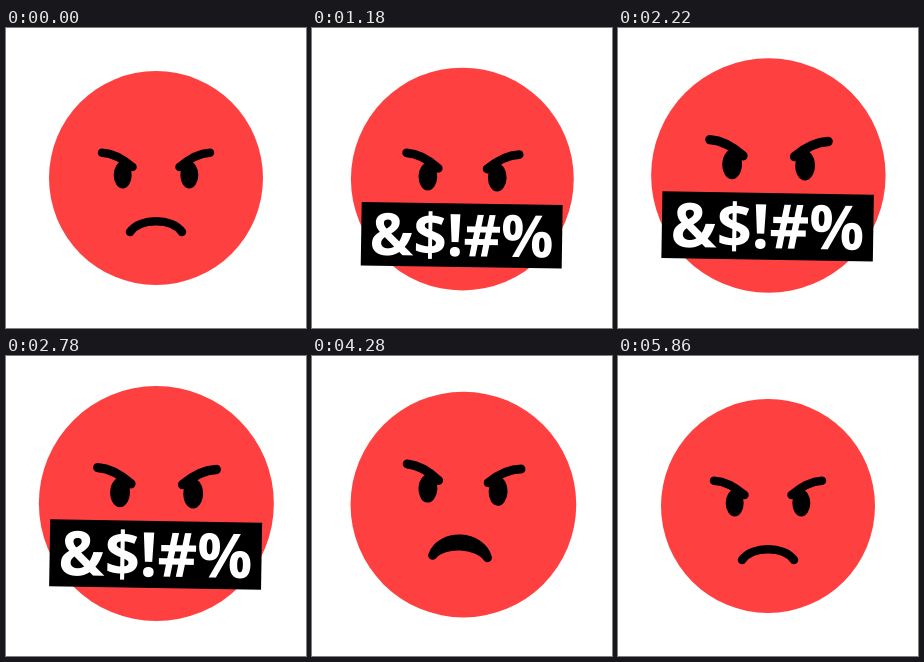
An HTML page that plays this animation: 300 by 300 pixels, repeating every 5.92 s.

```html
<!DOCTYPE html>
<html lang="en">
<head>
<meta charset="utf-8">
<title>Furious face</title>
<style>
  html, body { margin: 0; width: 100%; height: 100%; overflow: hidden; background: #fff; }
  svg { display: block; width: 100%; height: 100%; }
  .line { fill: none; stroke: #000; stroke-width: 8.5; stroke-linecap: round; stroke-linejoin: round; }
  text { font: 700 56px "Noto Sans", "Open Sans", sans-serif; fill: #fff; text-anchor: middle; }
</style>
</head>
<body>
<svg viewBox="0 0 300 300">
  <defs>
    <g id="eye">
      <ellipse cx="33.3" rx="9" ry="13.5"/>
      <path class="line" d="M54-22.3Q39-21.5 23.5-8"/>
    </g>
  </defs>
  <circle id="head" fill="#ff4040"/>
  <g id="face">
    <use href="#eye"/>
    <use href="#eye" transform="scale(-1 1)"/>
    <path id="mouth" class="line"/>
    <g id="bar">
      <rect x="-96.5" y="-30.5" width="193" height="61"/>
      <text id="words" y="20"></text>
    </g>
  </g>
</svg>
<script>
const LOOP = 5920, STEP = 20, FIRST = 60, LAST = 5860;
const RADIUS = 107;
const [head, face, mouth, bar, words] =
  ['head', 'face', 'mouth', 'bar', 'words'].map(id => document.getElementById(id));
const swears = ['&$!#%', '@!$%&'];

// Smooth progress from 0 to 1 between two times.
function ease(t, from, to) {
  const u = Math.min(1, Math.max(0, (t - from) / (to - from)));
  return u * u * (3 - 2 * u);
}

function mouthPath(open) {
  const y = 57 + 11 * open, x = 16 + 5 * open;
  const top = 42.5 - 2.5 * open, low = 42.5 + 13.5 * open;
  const arch = `M-26 ${y}C${-x} ${top} ${x} ${top} 26 ${y}`;
  return open ? `${arch}C16 ${low} -16 ${low} -26 ${y}Z` : arch;
}

function draw(t) {
  const windUp = ease(t, 60, 600);
  const slam = ease(t, 640, 870);
  const rise = ease(t, 870, 1400);
  const swell = ease(t, 820, 2400);
  const lean = ease(t, 2780, 3040);
  const sour = ease(t, 2780, 3560);
  const calm = ease(t, 3800, 4840);
  const settle = ease(t, 5040, 5560);

  const shake = ease(t, 860, 1240) - ease(t, 3000, 3400);
  const wave = shake * Math.sin(2 * Math.PI * (t / 400 - 4.5));
  const radius = RADIUS + 3.5 * ease(t, 640, 820) + 7 * swell - 10.5 * calm;

  head.setAttribute('cx', 150 + 2.5 * (lean - calm) + 1.2 * wave);
  head.setAttribute('cy', 150 - 6 * windUp + 13 * slam - 9.5 * rise + 2.5 * calm);
  head.setAttribute('r', radius);

  const x = 150 + 4 * sour - 6.7 * calm + 2.7 * settle + 2 * wave;
  const y = 147 - 13 * windUp + 35 * slam - 32 * rise - 11 * sour + 18 * calm + 3 * settle;
  const tilt = 4.6 * (sour - calm) + 3 * wave;
  face.setAttribute('transform', `translate(${x} ${y}) rotate(${tilt}) scale(${radius / RADIUS})`);

  const open = ease(t, 200, 600) - calm;
  mouth.setAttribute('d', mouthPath(open));
  mouth.style.fill = open ? '#000' : 'none';

  const pop = ease(t, 640, 800) - ease(t, 3380, 3520);
  bar.style.display = pop ? '' : 'none';
  bar.setAttribute('transform', `translate(0 56) scale(${pop})`);
  words.textContent = swears[Math.floor(t / 700 + 1) % 2];
}

function tick() {
  const t = Math.floor(performance.now() % LOOP / STEP) * STEP;
  draw(Math.min(Math.max(t, FIRST), LAST));
  requestAnimationFrame(tick);
}
tick();
</script>
</body>
</html>
```
